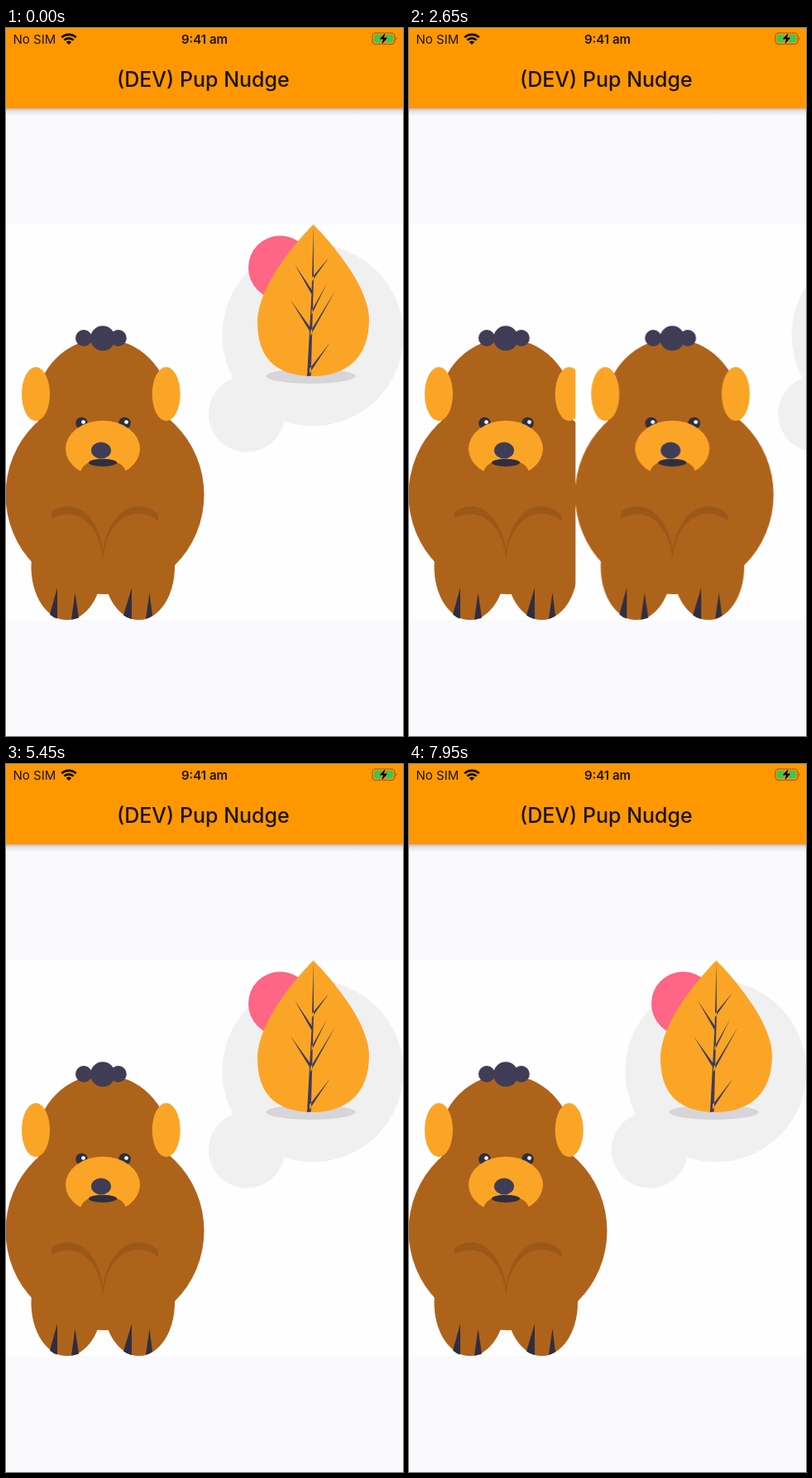
Recreate the animation shown at these times as an HTML page. Size 480 px wide and 854 px high, loop 8 s.

```html
<!DOCTYPE html>
<html lang="en">
<head>
<meta charset="utf-8">
<title>Swipe cards</title>
<style>
  html, body { margin: 0; width: 100%; height: 100%; overflow: hidden; background: #faf9fc; }
  svg { display: block; width: 480px; height: 854px; }
  text { font-family: Inter, Roboto, sans-serif; fill: #1c1206; }
  .top, .liked, .nope { animation: 8s linear infinite; }
  .top { animation-name: swipe; }
  .liked { animation-name: liked; }
  .nope { animation-name: nope; }
  .toast { font-size: 18.7px; fill: #fff; text-anchor: middle; }

  /* 1% = 80 ms: right and away, left and away, right and back */
  @keyframes swipe {
    0%, 25.625% { transform: translateX(0); }
    27.5% { transform: translateX(45.5px); }
    35.625% { transform: translateX(270px); }
    37.5% { transform: translateX(480px); }
    37.501%, 52.5% { transform: translateX(0); }
    59.375% { transform: translateX(-145.5px); }
    65% { transform: translateX(-300px); }
    66.875% { transform: translateX(-480px); }
    66.876%, 77.5% { transform: translateX(0); }
    83.125% { transform: translateX(260px); }
    85.625% { transform: translateX(224.7px); }
    88.125%, 100% { transform: translateX(0); }
  }
  @keyframes liked {
    0%, 39.06% { opacity: 0; }
    40.94%, 59.69% { opacity: 1; }
    60.94%, 100% { opacity: 0; }
  }
  @keyframes nope {
    0%, 70% { opacity: 0; }
    71.875%, 91.25% { opacity: 1; }
    92.5%, 100% { opacity: 0; }
  }
</style>
</head>
<body>
<svg viewBox="0 0 480 854" xmlns="http://www.w3.org/2000/svg">
  <defs>
    <linearGradient id="shade" x2="0" y2="1">
      <stop stop-color="#6b6a78" stop-opacity=".42"/>
      <stop offset=".4" stop-color="#6b6a78" stop-opacity=".14"/>
      <stop offset="1" stop-color="#6b6a78" stop-opacity="0"/>
    </linearGradient>

    <g id="bubble">
      <g fill="#f0f0f0">
        <circle cx="371" cy="370.5" r="109.5"/>
        <circle cx="291" cy="465.5" r="46"/>
      </g>
      <circle cx="331.5" cy="289" r="38.5" fill="#ff6584"/>
      <ellipse cx="368.5" cy="420" rx="54" ry="9" fill="#d6d5d9"/>
      <path fill="#fba526" d="M371.5 237C371.5 237 304 303 304 355C304 402 331 420 371 420C411 420 439 398 439 352C439 303 371.5 237 371.5 237Z"/>
      <path fill="#3f3d56" d="M371.7 240L372 300L368.7 419.5L364 420L369.5 320Z
        M391 276L370 301V305.5Z M349 285L370.5 317V323Z M388 308L369.5 341V346Z
        M398 317L368 366V371.5Z M344 328L368.5 362V368Z M392 379L367 411V416.5Z"/>
    </g>

    <g id="bear">
      <g fill="#ae631b">
        <circle cx="119.5" cy="563" r="120"/>
        <circle cx="117" cy="455" r="80"/>
        <ellipse cx="73.5" cy="650" rx="43" ry="64"/>
        <ellipse cx="160.8" cy="650" rx="43.2" ry="64"/>
      </g>
      <g fill="#fba526">
        <ellipse cx="36" cy="441.5" rx="17" ry="32.5"/>
        <ellipse cx="193.7" cy="441.5" rx="17" ry="32.5"/>
      </g>
      <g fill="#3f3d56">
        <circle cx="94" cy="374" r="10"/>
        <circle cx="117" cy="374.3" r="15"/>
        <circle cx="135.8" cy="374" r="10"/>
      </g>
      <g fill="#2f2e41">
        <circle cx="91.5" cy="476.7" r="7.3"/>
        <circle cx="143.5" cy="476.7" r="7.3"/>
      </g>
      <g fill="#fff">
        <circle cx="93.5" cy="475.3" r="2.4"/>
        <circle cx="145.5" cy="475.3" r="2.4"/>
      </g>
      <ellipse cx="117" cy="507.5" rx="45" ry="34" fill="#fba526"/>
      <ellipse cx="117.5" cy="537" rx="27.5" ry="16.5" fill="#ae631b"/>
      <ellipse cx="117" cy="524.3" rx="17" ry="4.6" fill="#2f2e41"/>
      <ellipse cx="115" cy="509.5" rx="12" ry="10" fill="#3f3d56"/>
      <path fill="#9c5818" d="M55 584C60 579 67 577 75 577C98 577 114 603 117.3 630C121 603 137 577 160 577C170 577 178 581 184 587V595C178 589 169 586 159 586C138 586 120 608 117.3 641C114 608 97 587 76 586.5C68 586.5 60 588 55 592Z"/>
      <path fill="#2f2e41" d="M62 675V712.5Q57 711 53 707.5Z M83.5 681L88 711.5Q84 713 79 713.8Z
        M152 675V713Q146 711.5 142 708.5Z M173.5 681L177 709Q173.5 711.5 169 712.7Z"/>
    </g>

    <g id="card">
      <rect y="237" width="480" height="477" fill="#fefdff"/>
      <use href="#bubble"/>
      <use href="#bear"/>
    </g>
  </defs>

  <rect width="480" height="854" fill="#faf9fc"/>
  <use href="#card"/>
  <g class="top"><use href="#card"/></g>

  <g class="liked">
    <rect x="192" y="741" width="96" height="49" rx="24.5" fill="#4caf50"/>
    <text class="toast" x="239.5" y="772">Liked!</text>
  </g>
  <g class="nope">
    <rect x="192" y="741" width="96" height="49" rx="24.5" fill="#f44336"/>
    <text class="toast" x="239.5" y="772">Nope!</text>
  </g>

  <rect y="97" width="480" height="9" fill="url(#shade)"/>
  <rect width="480" height="97" fill="#ff9800"/>
  <text x="8.5" y="18.7" font-size="15">No SIM</text>
  <text x="240" y="18.7" font-size="15" font-weight="600" text-anchor="middle">9:41 am</text>
  <text x="134" y="70.5" font-size="25" font-weight="500">(DEV) Pup Nudge</text>

  <g fill="none" stroke="#000" stroke-width="2.7">
    <path d="M67.3 11.3A12.5 12.5 0 0 1 84.7 11.3"/>
    <path d="M70.4 14.6A8 8 0 0 1 81.6 14.6"/>
  </g>
  <path d="M76 20L72.9 16.9A4.4 4.4 0 0 1 79.1 16.9Z"/>

  <rect x="443" y="6" width="27" height="13.5" rx="4" fill="none" stroke="#8f5a10" stroke-width="1.1"/>
  <path d="M471.5 10.5Q473.6 12.7 471.5 15Z" fill="#8f5a10"/>
  <rect x="445" y="8" width="23" height="9.5" rx="2.3" fill="#34c759"/>
  <path d="M459 5.5L451.5 13.5H456L454 20L461.5 11.6H457Z" stroke="#ff9800" stroke-width="1.6" paint-order="stroke"/>
</svg>
</body>
</html>
```
